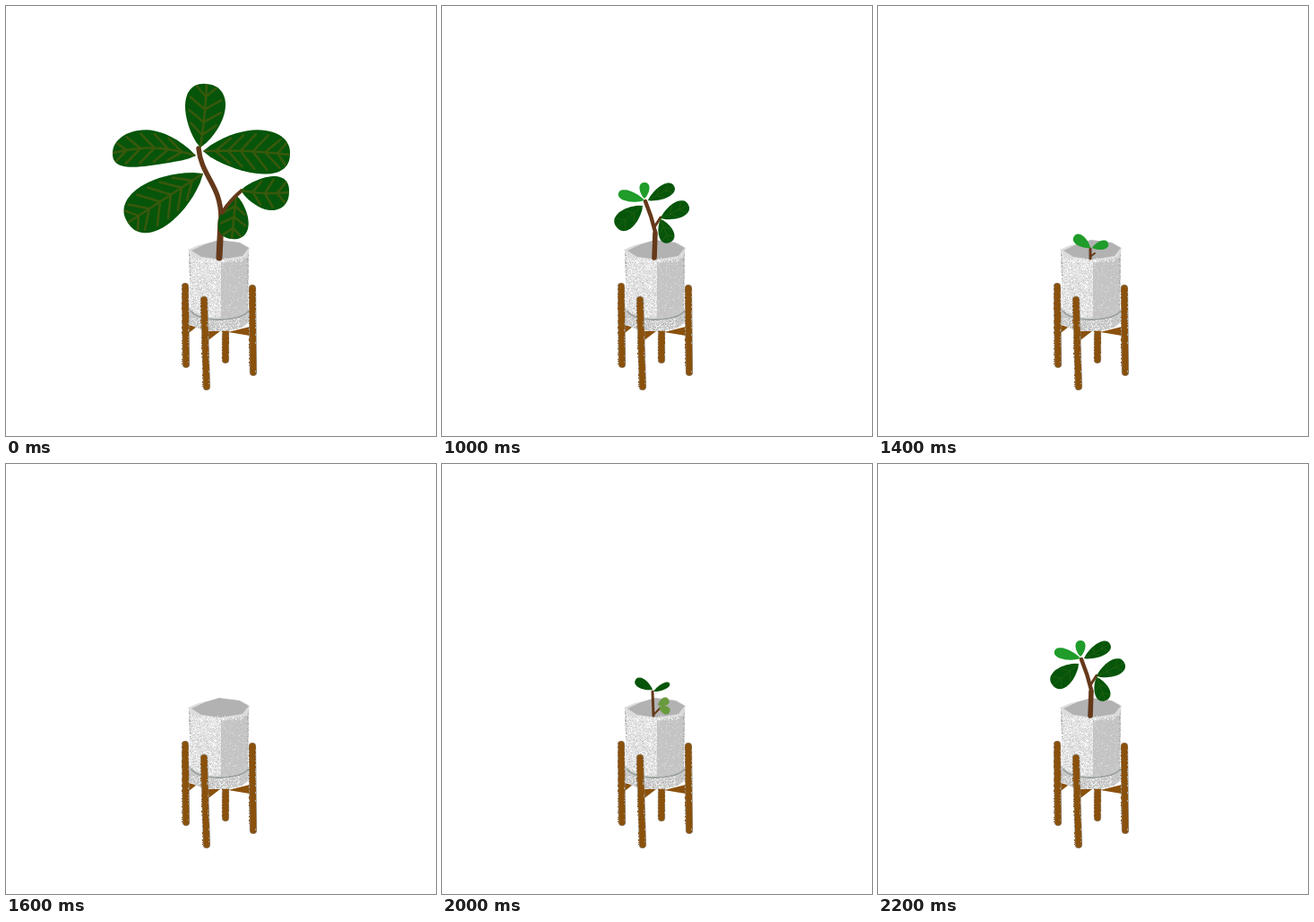
Write an HTML page with a canvas that moves like this. It is 480 px wide and 480 px high and loops after 2510 ms.

```html
<!DOCTYPE html>
<html lang="en">
<head>
<meta charset="utf-8">
<title>Growing plant</title>
<style>
  html, body { margin: 0; width: 100%; height: 100%; overflow: hidden; background: #fff; }
  canvas { display: block; width: 480px; height: 480px; }
</style>
</head>
<body>
<canvas id="stage" width="480" height="480"></canvas>
<script>
const SIZE = 480, LOOP = 2510;
const WOOD = '#8a510c', BARK = '#65391a';
const DARK = '#06550a', FRESH = '#1f9c2a', PALE = '#699a3c';

function seeded(seed) {
  return () => {
    seed = (seed * 1664525 + 1013904223) >>> 0;
    return seed / 4294967296;
  };
}

function layer(paint) {
  const sheet = document.createElement('canvas');
  sheet.width = sheet.height = SIZE;
  const g = sheet.getContext('2d');
  g.lineCap = g.lineJoin = 'round';
  paint(g);
  return sheet;
}

function stroke(g, color, width, d) {
  g.strokeStyle = color;
  g.lineWidth = width;
  g.stroke(new Path2D(d));
}

function fill(g, color, d) {
  g.fillStyle = color;
  g.fill(new Path2D(d));
}

function grain(g, rnd, count, color, x, y, w, h) {
  g.fillStyle = color;
  for (let i = 0; i < count; i++) {
    g.fillRect(Math.floor(x + rnd() * w), Math.floor(y + rnd() * h), 1, 1);
  }
}

// A leaf narrows to its base (x, y), swells by `half` and ends round at (tx, ty).
function leaf(g, color, x, y, tx, ty, half, bend = 0) {
  const dx = tx - x, dy = ty - y, len = Math.hypot(dx, dy);
  const point = (t, side) => {
    const swell = t * Math.sqrt(1 - t) / 0.385;
    const off = bend * Math.sin(Math.PI * t) + side * half * swell ** 0.85;
    return [x + dx * t - dy / len * off, y + dy * t + dx / len * off];
  };
  const shape = new Path2D(), steps = 24;
  for (let i = -steps; i <= steps; i++) {
    const s = 1 - Math.abs(i) / steps;
    shape.lineTo(...point(1 - (1 - s) ** 2, Math.sign(i)));
  }
  g.fillStyle = color;
  g.fill(shape);
  if (half < 7) return;

  const big = len > 45, pairs = big ? Math.round(len / 17) : 2;
  g.save();
  g.clip(shape);
  g.strokeStyle = big ? '#38580c' : '#1f600f';
  g.lineWidth = big ? 2.6 : 1;
  g.beginPath();
  for (let t = 0; t <= 1; t += 0.1) g.lineTo(...point(t, 0));
  for (let i = 1; i <= pairs; i++) {
    const t = i / (pairs + 1);
    for (const side of [-0.8, 0.8]) {
      g.moveTo(...point(t, 0));
      g.lineTo(...point(Math.min(t + 0.17, 0.95), side));
    }
  }
  g.stroke();
  g.restore();
}

function leg(g, rnd, x1, y1, x2, y2) {
  const d = `M${x1} ${y1}L${x2} ${y2}`;
  stroke(g, '#91897c', 8.2, d);
  stroke(g, WOOD, 6.8, d);
  for (let y = y1; y < y2; y++) {
    const x = x1 + (x2 - x1) * (y - y1) / (y2 - y1);
    g.fillStyle = rnd() < 0.5 ? WOOD : '#aaa59c';
    g.fillRect(Math.floor(x + (rnd() < 0.5 ? -4 : 3)), y, 1, 1);
  }
}

const pot = layer(g => {
  const rnd = seeded(17);
  leg(g, rnd, 245, 362, 245, 395);
  fill(g, WOOD, 'M203 356L213 358L204 365Z M225 363L239 363L226 373Z M248 364L272 358L272 368Z');

  const dish = 'M201 339Q204 335 236 336Q268 335 272 339L271 353Q262 363 237 363Q208 362 201 351Z';
  fill(g, '#cacaca', dish);
  g.save();
  g.clip(new Path2D(dish));
  grain(g, rnd, 350, '#ededed', 201, 348, 60, 16);
  grain(g, rnd, 100, '#a8a8a8', 201, 336, 71, 28);
  g.restore();

  const body = 'M204 273L216 281L240 285L264 281L271 272L270 338Q264 348 238 349Q212 347 206 338Z';
  stroke(g, '#9ca29c', 2, 'M207 341Q214 350 238 350Q264 349 270 341');
  fill(g, '#dedede', body);
  g.save();
  g.clip(new Path2D(body));
  g.fillStyle = '#c4c4c4';
  g.fillRect(240, 270, 32, 82);
  grain(g, rnd, 900, '#f7f7f7', 205, 276, 35, 72);
  grain(g, rnd, 240, '#c6c6c6', 204, 276, 36, 72);
  grain(g, rnd, 200, '#d8d8d8', 240, 284, 31, 64);
  grain(g, rnd, 60, '#a0a0a0', 204, 272, 2, 70);
  grain(g, rnd, 60, '#a5a5a5', 269, 272, 3, 70);
  g.restore();

  fill(g, '#dcdcdc', 'M203 272L215 267L236 262L262 264L272 270L269 281L240 286L210 281Z');
  fill(g, '#b2b2b2', 'M207 273L222 266L238 261L260 264L271 270L264 279L240 283L218 280Z');
  grain(g, rnd, 80, '#f5f5f5', 207, 281, 58, 5);

  leg(g, rnd, 200, 313, 201, 400);
  leg(g, rnd, 221, 328, 224, 425);
  leg(g, rnd, 275, 315, 276, 409);
});

const tall = layer(g => {
  stroke(g, BARK, 5.5, 'M238 281L240 236C240 200 218 190 215 159');
  stroke(g, BARK, 7, 'M238 281L240 240');
  leaf(g, DARK, 217, 158, 224, 87, 22.5, 1);
  leaf(g, DARK, 212, 167, 119, 164, 20.5, 7);
  leaf(g, DARK, 220, 162, 317, 166, 24.5, -2);
  leaf(g, DARK, 220, 187, 136, 242, 26);
  leaf(g, DARK, 257, 211, 252, 260, 17);
  stroke(g, BARK, 4, 'M241 231Q249 218 263 206');
  leaf(g, DARK, 262, 206, 316, 208, 19, 2);
});

const medium = layer(g => {
  stroke(g, BARK, 4.5, 'M237 281L238 252Q234 235 227 218');
  stroke(g, BARK, 5.5, 'M237 281L238 254');
  stroke(g, BARK, 3, 'M237 247L244 236');
  leaf(g, FRESH, 226, 215, 226, 197, 5.5);
  leaf(g, FRESH, 226, 217, 197, 209, 6);
  leaf(g, DARK, 230, 217, 259, 201, 7.5);
  leaf(g, DARK, 224, 223, 195, 247, 11);
  leaf(g, DARK, 244, 237, 275, 222, 9);
  leaf(g, DARK, 244, 238, 254, 264, 8.5);
});

const small = layer(g => {
  stroke(g, BARK, 3, 'M236 281L235 254');
  stroke(g, BARK, 2, 'M237 279L244 272');
  leaf(g, DARK, 235, 252, 216, 241, 5.5);
  leaf(g, DARK, 236, 254, 254, 245, 3.5);
  leaf(g, PALE, 241, 269, 253, 263, 4.5);
  leaf(g, PALE, 242, 271, 254, 277, 4.5);
});

const sprout = layer(g => {
  stroke(g, BARK, 3, 'M237 282L237 271');
  stroke(g, BARK, 2, 'M238 279L242 276');
  leaf(g, FRESH, 237, 270, 219, 257, 6);
  leaf(g, FRESH, 239, 270, 257, 265, 5);
});

// Shrinks to the bare pot and grows back, one step each 200 ms after a pause.
const steps = [tall, medium, small, sprout, null, sprout, small, medium];
const ctx = document.getElementById('stage').getContext('2d');
let start = null;

function draw(now) {
  start ??= now;
  const t = Math.max(0, now - start) % LOOP;
  const step = Math.max(0, Math.min(7, Math.floor((t - 800) / 200)));
  ctx.fillStyle = '#fff';
  ctx.fillRect(0, 0, SIZE, SIZE);
  ctx.drawImage(pot, 0, 0);
  if (steps[step]) ctx.drawImage(steps[step], 0, 0);
  requestAnimationFrame(draw);
}
requestAnimationFrame(draw);
</script>
</body>
</html>
```
